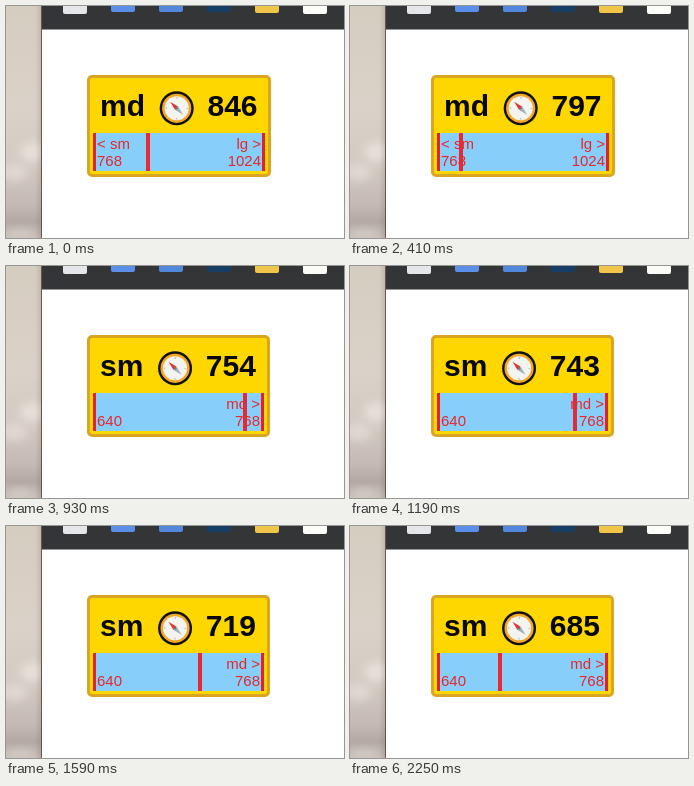
Write an HTML page that moves like this. It is 338x232 px and loops after 2380 ms.

```html
<!DOCTYPE html>
<html lang="en">
<head>
<meta charset="utf-8">
<title>Breakpoint compass</title>
<style>
  html, body { margin: 0; width: 100%; height: 100%; overflow: hidden; background: #fff; }
  svg { display: block; width: 338px; height: 232px; }
  text { font-family: "Liberation Sans", Arial, sans-serif; white-space: pre; }
  .big { font-size: 30px; font-weight: bold; fill: #080808; }
  .small { font-size: 15px; fill: #e6282a; }
  .end { text-anchor: end; }
</style>
</head>
<body>
<svg viewBox="0 0 338 232">
  <defs>
    <linearGradient id="sky" x2="0" y2="1">
      <stop offset="0" stop-color="#d6cdc1"/>
      <stop offset=".45" stop-color="#dad2c8"/>
      <stop offset=".7" stop-color="#d2c9c1"/>
      <stop offset=".86" stop-color="#c3b9b2"/>
      <stop offset=".93" stop-color="#b3a8a2"/>
      <stop offset="1" stop-color="#c9c0b9"/>
    </linearGradient>
    <linearGradient id="shade">
      <stop offset="0" stop-color="#4a403c" stop-opacity="0"/>
      <stop offset="1" stop-color="#4a403c" stop-opacity=".18"/>
    </linearGradient>
    <filter id="soft" x="-50%" y="-50%" width="200%" height="200%"><feGaussianBlur stdDeviation="4"/></filter>
  </defs>

  <rect width="338" height="232" fill="#fff"/>
  <rect width="36" height="232" fill="url(#sky)"/>
  <g filter="url(#soft)">
    <ellipse cx="27" cy="146" rx="13" ry="10" fill="#e6dfd8"/>
    <ellipse cx="8" cy="166" rx="13" ry="9" fill="#dfd7d1"/>
    <ellipse cx="14" cy="228" rx="14" ry="5" fill="#d3cac4"/>
  </g>
  <rect x="29" width="7" height="232" fill="url(#shade)"/>
  <rect x="35" width="1" height="232" fill="#6b5551"/>
  <rect x="36" width="302" height="232" fill="#fff"/>
  <rect x="36" width="302" height="23.5" fill="#343536"/>
  <g id="icons"></g>

  <rect id="card" x="82.5" y="70.5" height="99" rx="3.5" fill="#ffd700" stroke="#daa520" stroke-width="3"/>
  <text id="name" class="big" x="94" y="110"></text>
  <g id="compass">
    <circle r="17" fill="#111"/>
    <circle r="14.6" fill="#f3a928"/>
    <circle r="12" fill="#f3f3ef"/>
    <circle r="10.4" fill="none" stroke="#b9c2c7" stroke-width="1.6" stroke-dasharray="1.4 14.936" stroke-dashoffset=".7"/>
    <path d="M-6.5-6.5L1.6-1.6L-1.6 1.6Z" fill="#e0362f"/>
    <path d="M6.5 6.5L1.6-1.6L-1.6 1.6Z" fill="#a5b2ba"/>
    <circle r="1.3" fill="#6b7880"/>
  </g>
  <text id="width" class="big" y="110"></text>

  <rect id="panel" x="87" y="127" height="38" fill="#87cefa"/>
  <rect x="87" y="127" width="3" height="38" fill="#e3202c"/>
  <rect id="limit" y="127" width="3" height="38" fill="#e3202c"/>
  <text id="prev" class="small" x="91" y="143"></text>
  <text id="min" class="small" x="91" y="160"></text>
  <text id="next" class="small end" y="143"></text>
  <text id="max" class="small end" y="160"></text>
  <rect id="marker" y="127" width="4" height="38" fill="#e52a35"/>
</svg>
<script>
  const LOOP = 2380;
  const TICKS = [0, 130, 260, 410, 540, 670, 800, 930, 1060, 1190, 1320, 1460, 1590, 1720, 1850, 1990, 2120, 2250];
  const WIDTHS = [[0, 846], [260, 811], [670, 774], [930, 754], [1320, 738], [1850, 701], [2250, 685]];
  const SM = { name: "sm", min: 640, max: 768, prev: "", next: "md >" };
  const MD = { name: "md", min: 768, max: 1024, prev: "< sm", next: "lg >" };

  const $ = id => document.getElementById(id);
  const set = (id, attr, value) => $(id).setAttribute(attr, value);
  const write = (id, value) => { $(id).textContent = value; };

  // Toolbar icons, cut off by the top edge
  const icons = [[57, 8, "#e4e6ea"], [105, 6, "#5b8fe8"], [153, 6, "#5288dc"],
                 [201, 6, "#173f66"], [249, 7, "#f0c64a"], [297, 8, "#fbfbf8"]];
  $("icons").innerHTML = icons.map(([x, bottom, fill]) =>
    `<rect x="${x}" y="${bottom - 24}" width="24" height="24" rx="2" fill="${fill}"/>`).join("");

  function widthAt(t) {
    const i = Math.max(1, WIDTHS.findIndex(([time]) => time >= t));
    const [t0, a] = WIDTHS[i - 1], [t1, b] = WIDTHS[i];
    return Math.round(a + (b - a) * (t - t0) / (t1 - t0));
  }

  function draw(ms) {
    const t = ms % LOOP;
    const width = widthAt(TICKS.filter(tick => tick <= t).pop());
    const point = width < 768 ? SM : MD;

    write("name", point.name);
    write("width", width);
    for (const key of ["prev", "min", "next", "max"]) write(key, point[key]);

    // The card grows with its heading
    const nameEnd = 94 + $("name").getComputedTextLength();
    const numX = nameEnd + 62.5;
    const right = Math.round(numX + $("width").getComputedTextLength() + 13.7);
    set("compass", "transform", `translate(${nameEnd + 31.7} 102.3)`);
    set("width", "x", numX);
    set("card", "width", right - 84);
    set("panel", "width", right - 93);
    set("limit", "x", right - 9);
    set("next", "x", right - 10);
    set("max", "x", right - 10);
    set("marker", "x", Math.round(90 + 165 * (width - point.min) / (point.max - point.min)));
  }

  const start = performance.now();
  function frame() {
    draw(performance.now() - start);
    requestAnimationFrame(frame);
  }
  frame();
</script>
</body>
</html>
```
